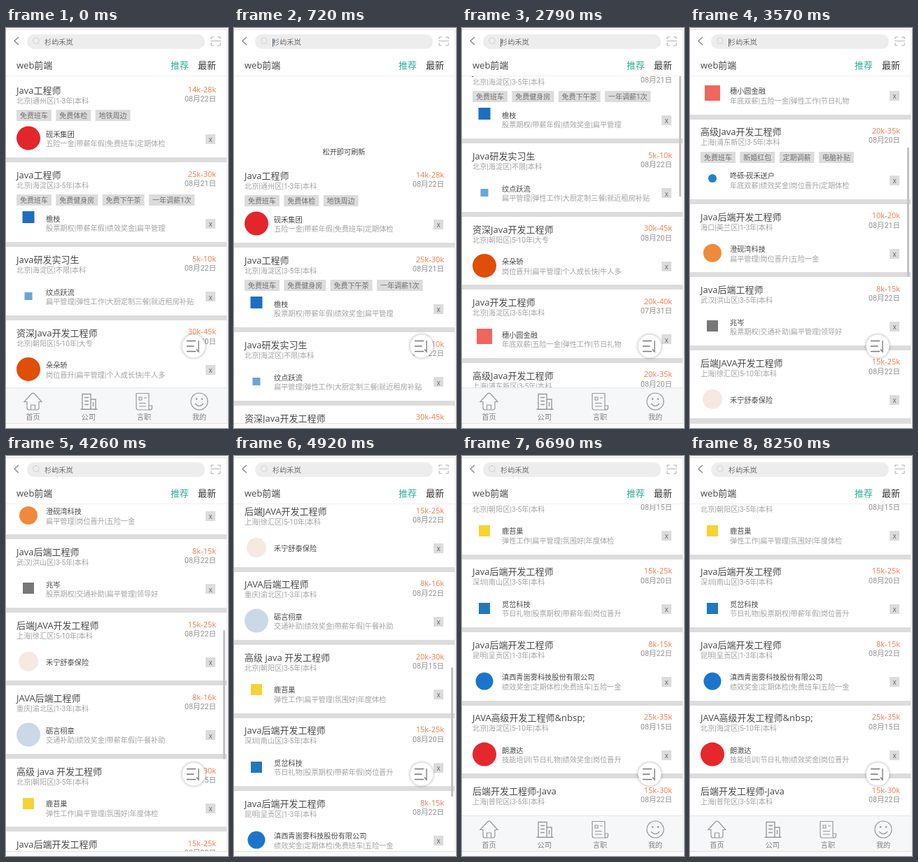
Animation of 317x572 px, one loop 8370 ms. Source, as an HTML page with a canvas:

```html
<!DOCTYPE html>
<html lang="zh">
<head>
<meta charset="utf-8">
<style>
html, body { margin: 0; width: 100%; height: 100%; overflow: hidden; background: #fafafa; }
canvas { display: block; width: 317px; height: 572px; }
</style>
</head>
<body>
<canvas id="stage"></canvas>
<script>
const W = 317, H = 572, LOOP = 8370, STEP = 30;
const LIST_TOP = 69, PAGE_BOTTOM = 566, TAB_TOP = 514;
const TITLE_FONT = '"Open Sans", "Noto Sans CJK SC", "Noto Sans CJK", sans-serif';
const SMALL_FONT = 'Roboto, "Noto Sans CJK SC", "Noto Sans CJK", sans-serif';
const DARK = '#484848', LIGHT = '#a3a3a3';

const canvas = document.getElementById('stage');
const ctx = canvas.getContext('2d');
const ratio = window.devicePixelRatio || 1;
canvas.width = W * ratio;
canvas.height = H * ratio;

// logo: [shape, colour, size, dy]
const jobs = [
  { title: 'Java工程师', place: '北京|通州区|1-3年|本科', pay: '14k-28k', date: '08月22日', tags: ['免费班车', '免费体检', '地铁周边'],
    firm: '砚禾集团', perks: '五险一金|带薪年假|免费班车|定期体检', logo: ['circle', '#e3262b', 34, 0] },
  { title: 'Java工程师', place: '北京|海淀区|3-5年|本科', pay: '25k-30k', date: '08月21日', tags: ['免费班车', '免费健身房', '免费下午茶', '一年调薪1次'],
    firm: '檐枝', perks: '股票期权|带薪年假|绩效奖金|扁平管理', logo: ['square', '#1c6fc0', 17, -8] },
  { title: 'Java研发实习生', place: '北京|海淀区|不限|本科', pay: '5k-10k', date: '08月22日',
    firm: '纹点跃流', perks: '扁平管理|弹性工作|大厨定制三餐|就近租房补贴', logo: ['square', '#6aa5d8', 11, 0] },
  { title: '资深Java开发工程师', place: '北京|朝阳区|5-10年|大专', pay: '30k-45k', date: '08月20日',
    firm: '朵朵轿', perks: '岗位晋升|扁平管理|个人成长快|牛人多', logo: ['circle', '#e04e08', 34, 0] },
  { title: 'Java开发工程师', place: '北京|海淀区|3-5年|本科', pay: '20k-40k', date: '07月31日',
    firm: '穗小圆金融', perks: '年底双薪|五险一金|弹性工作|节日礼物', logo: ['square', '#f0665c', 22, -3] },
  { title: '高级Java开发工程师', place: '上海|浦东新区|3-5年|本科', pay: '20k-35k', date: '08月20日', tags: ['免费班车', '新婚红包', '定期调薪', '电脑补贴'],
    firm: '咚砾-砚禾送户', perks: '年底双薪|绩效奖金|岗位晋升|定期体检', logo: ['circle', '#1d82cf', 12, -2] },
  { title: 'Java后端开发工程师', place: '海口|美兰区|1-3年|本科', pay: '10k-20k', date: '08月21日',
    firm: '澄砚湾科技', perks: '扁平管理|岗位晋升|五险一金', logo: ['circle', '#ef8a3a', 26, 0] },
  { title: 'Java后端工程师', place: '武汉|洪山区|3-5年|本科', pay: '8k-15k', date: '08月22日',
    firm: '兆岑', perks: '股票期权|交通补助|扁平管理|领导好', logo: ['square', '#777', 16, 0] },
  { title: '后端JAVA开发工程师', place: '上海|徐汇区|5-10年|本科', pay: '15k-25k', date: '08月22日',
    firm: '禾宁舒泰保险', perks: '', logo: ['circle', '#f6e9e1', 28, 0] },
  { title: 'JAVA后端工程师', place: '重庆|渝北区|1-3年|本科', pay: '8k-16k', date: '08月22日',
    firm: '砺言栩章', perks: '交通补助|绩效奖金|带薪年假|午餐补助', logo: ['circle', '#cbd9e6', 34, 0] },
  { title: '高级 java 开发工程师', place: '北京|朝阳区|3-5年|本科', pay: '20k-30k', date: '08月15日',
    firm: '鹿苔巢', perks: '弹性工作|扁平管理|氛围好|年度体检', logo: ['square', '#f7d235', 16, -6] },
  { title: 'Java后端开发工程师', place: '深圳|南山区|3-5年|本科', pay: '15k-25k', date: '08月20日',
    firm: '觅岔科技', perks: '节日礼物|股票期权|带薪年假|岗位晋升', logo: ['square', '#2079bd', 16, 0] },
  { title: 'Java后端开发工程师', place: '昆明|呈贡区|1-3年|本科', pay: '8k-15k', date: '08月22日',
    firm: '滇西青崮雾科技股份有限公司', perks: '绩效奖金|定期体检|免费班车|五险一金', logo: ['circle', '#1b76c9', 25, 0] },
  { title: 'JAVA高级开发工程师&nbsp;', place: '北京|海淀区|5-10年|本科', pay: '25k-35k', date: '08月15日',
    firm: '朗澈达', perks: '技能培训|节日礼物|绩效奖金|岗位晋升', logo: ['circle', '#e6282d', 34, 0] },
  { title: '后端开发工程师-Java', place: '上海|普陀区|3-5年|本科', pay: '15k-30k', date: '08月22日',
    firm: '榆屿科技', perks: '五险一金|带薪年假', logo: ['circle', '#555', 34, 0] }
];

let nextY = 89;
for (const job of jobs) {
  job.y = nextY;
  nextY += job.tags ? 121.2 : 104.5;
}

// [time, scroll position, ease-out power]; negative positions are the pull-down
const scrollKeys = [
  [0, 0, 1], [420, 0, 1], [720, -122, 1.6], [810, -128, 2], [930, -128, 1], [1110, -50, 2],
  [2040, -50, 1], [2250, 0, 2], [2640, 0, 1], [2790, 148, 1], [3630, 496.5, 3],
  [3810, 496.5, 1], [3930, 594, 1], [4560, 750, 3], [4740, 750, 1], [4920, 896, 1],
  [5460, 1109, 3], [5700, 1109, 1], [5760, 1123, 1], [LOOP, 1123, 1]
];

function scrollAt(t) {
  const i = scrollKeys.findIndex(k => k[0] > t);
  const [t0, p0] = scrollKeys[i - 1];
  const [t1, p1, power] = scrollKeys[i];
  return p0 + (p1 - p0) * (1 - Math.pow(1 - (t - t0) / (t1 - t0), power));
}

const within = (t, a, b) => t >= a && t < b;

function text(str, x, cy, size, color, align = 'left', family = SMALL_FONT) {
  ctx.font = `${size}px ${family}`;
  ctx.textAlign = align;
  ctx.fillStyle = color;
  ctx.fillText(str, x, Math.round(cy + size * 0.37));
}

function rect(x, y, w, h, color) {
  ctx.fillStyle = color;
  ctx.fillRect(x, y, w, h);
}

function pill(x, y, w, h, r, color) {
  ctx.fillStyle = color;
  ctx.beginPath();
  ctx.roundRect(x, y, w, h, r);
  ctx.fill();
}

function disc(x, y, r, color) {
  ctx.fillStyle = color;
  ctx.beginPath();
  ctx.arc(x, y, r, 0, Math.PI * 2);
  ctx.fill();
}

function stroke(path, color, width = 1.2) {
  ctx.strokeStyle = color;
  ctx.lineWidth = width;
  ctx.stroke(new Path2D(path));
}

function drawJob(job, y) {
  const low = y + (job.tags ? 16.5 : 0);
  text(job.title, 15, y, 13, DARK, 'left', TITLE_FONT);
  text(job.place, 15, y + 15, 10.2, LIGHT);
  text(job.pay, 300, y - 1.5, 11, '#f47a48', 'right', TITLE_FONT);
  text(job.date, 300, y + 12, 10.6, '#929292', 'right');

  let x = 15;
  for (const tag of job.tags || []) {
    ctx.font = `10px ${SMALL_FONT}`;
    const w = ctx.measureText(tag).width + 10;
    rect(x, Math.round(y + 28), w, 16, '#dcdcdc');
    text(tag, x + 5, y + 36.5, 10, '#707070');
    x += w + 6.3;
  }

  const [shape, color, size, dy] = job.logo;
  const cy = low + 52 + dy;
  if (shape === 'circle') disc(32, cy, size / 2, color);
  else rect(32 - size / 2, Math.round(cy - size / 2), size, size, color);

  text(job.firm, 57, low + (job.perks ? 46.5 : 53), 10.2, DARK);
  text(job.perks, 57, low + 60, 10.2, LIGHT);
  rect(285, Math.round(low + 46), 14, 14, '#dcdcdc');
  text('x', 292, low + 53.5, 10, '#666', 'center', TITLE_FONT);
}

function drawList(pos) {
  ctx.save();
  ctx.beginPath();
  ctx.rect(0, LIST_TOP, 316, PAGE_BOTTOM - LIST_TOP);
  ctx.clip();
  if (pos < 0) text('松开即可刷新', 157, 55 - pos, 10.2, DARK, 'center');
  jobs.forEach((job, i) => {
    const y = job.y - pos;
    if (y < -80 || y > H + 40) return;
    if (i) rect(0, Math.floor(y - 24.5), 316, 7, '#dcdcdc');
    drawJob(job, y);
  });
  ctx.restore();
}

function drawScrollbar(t, pos) {
  if (!within(t, 2670, 6330)) return;
  ctx.save();
  ctx.beginPath();
  ctx.rect(300, LIST_TOP, 16, PAGE_BOTTOM - LIST_TOP);
  ctx.clip();
  ctx.globalAlpha = Math.min(1, (6330 - t) / 240);
  pill(310, 7.5 + pos * 0.329, 3, 185, 1.5, '#c2c2c2');
  ctx.restore();
}

function drawHeader(caretOn) {
  rect(0, 2, 316, LIST_TOP - 2, '#fff');
  rect(0, 2, 316, 1, '#e4e4e4');
  rect(0, 68, 316, 1, '#efefef');
  stroke('M18 13 L12 18.5 L18 24', '#888', 1.4);
  pill(30, 9, 254, 21, 10.5, '#ededed');
  stroke('M38.5 18 a4.3 4.3 0 1 0 8.6 0 a4.3 4.3 0 1 0 -8.6 0 M46 21.5 l2 2', '#d2d2d2', 1);
  text('杉屿禾岚', 55, 20.5, 10.2, '#707070');
  if (caretOn) rect(55, 15, 1, 12, '#5a6b85');
  stroke('M293 16 v-3 h4 M302 13 h4 v3 M306 21 v4 h-4 M297 25 h-4 v-4 M292 18.5 h15', '#b4b4b4', 1.1);
  text('web前端', 15, 53.5, 13, DARK, 'left', TITLE_FONT);
  text('推荐', 235, 53, 13, '#2bb196');
  text('最新', 274, 53, 13, '#383838');
}

function drawSortButton() {
  ctx.save();
  ctx.shadowColor = 'rgba(0,0,0,.35)';
  ctx.shadowBlur = 4 * ratio;
  disc(268, 455, 16.5, '#fff');
  ctx.restore();
  stroke('M258 447.5 h13 M258 455 h10.5 M258 462.5 h13', '#777', 1.3);
  stroke('M275 447 v16 l-3 -3.5', '#777', 1.3);
}

function drawTabs() {
  const gray = '#999';
  rect(0, TAB_TOP, 316, PAGE_BOTTOM - TAB_TOP, '#f6f7f9');
  rect(0, TAB_TOP, 316, 1, '#e3e5e8');
  stroke('M26 534.5 L36.5 523 Q38.5 521.3 40.5 523 L51 534.5 H47 V543 Q47 546 44 546 H33 Q30 546 30 543 V534.5 Z M35.5 546 V539 H41.5 V546', gray);
  stroke('M109 545 V523.5 H121 V545 M121 531 H128 V545 M106.5 545.3 H130.5 M112 528.5 h6 M112 533.5 h6 M112 538.5 h6 M124.5 535 v6', gray, 1.4);
  stroke('M186 522.5 H204 V540 H208.5 V543 Q208.5 546 205.5 546 H189 Q186 546 186 543 Z M204 540 V543 Q204 546 206 546 M190 528 h4 v4 h-4 Z M197 529 h4 M190 536.5 h10 M190 541 h10', gray);
  stroke('M264 534 a12 12 0 1 0 24 0 a12 12 0 1 0 -24 0 M270 537 Q276 544 282 537', gray);
  disc(272, 530.5, 1.3, gray);
  disc(280, 530.5, 1.3, gray);
  ['首页', '公司', '言职', '我的'].forEach((label, i) =>
    text(label, 38.5 + i * 79.2, 556.5, 10.2, '#808080', 'center'));
}

function draw(t) {
  const pos = scrollAt(t);
  const caretOn = Math.floor(t / 477.5) % 2 === 1 && t < 8250;
  const tabsHidden = within(t, 570, 1020) || within(t, 2820, 5400);

  ctx.setTransform(ratio, 0, 0, ratio, 0, 0);
  rect(0, 0, W, H, '#fafafa');
  rect(0, 2, 316, PAGE_BOTTOM - 2, '#fff');
  drawList(pos);
  drawScrollbar(t, pos);
  drawHeader(caretOn);
  if (!tabsHidden) drawTabs();
  drawSortButton();
  rect(315, 2, 1, PAGE_BOTTOM - 2, '#ececec');
  rect(0, PAGE_BOTTOM - 1, 316, 1, '#e2e2e2');
}

const start = performance.now();
function tick() {
  const t = (performance.now() - start) % LOOP;
  draw(Math.floor(t / STEP) * STEP);
  requestAnimationFrame(tick);
}
tick();
</script>
</body>
</html>
```
